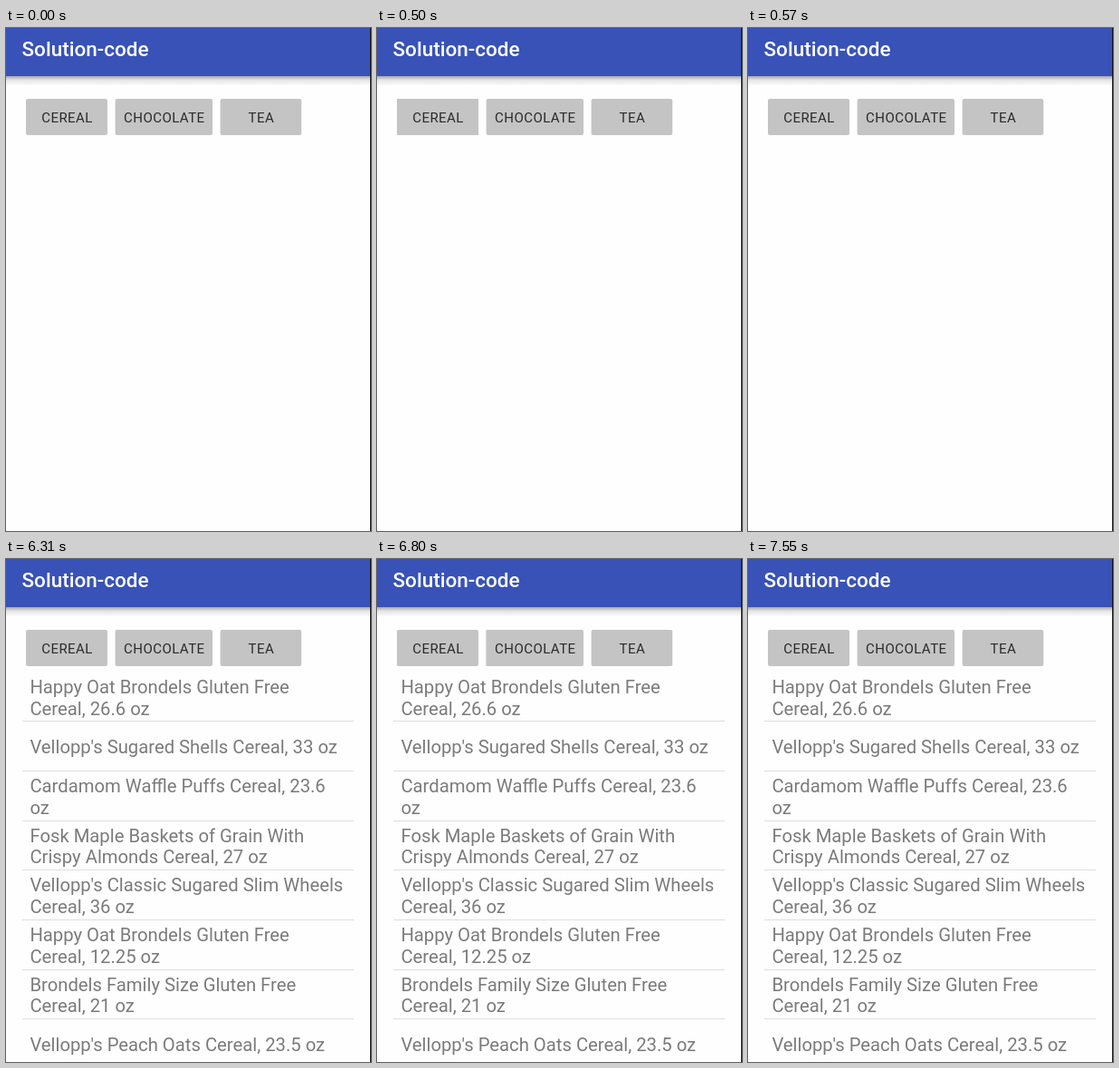
These frames come from a looping animation (403 by 554 pixels, 8 s). An HTML page:

```html
<!DOCTYPE html>
<html lang="en">
<head>
<meta charset="utf-8">
<title>Grocery search</title>
<style>
  html, body { margin: 0; width: 100%; height: 100%; overflow: hidden; background: #fefefe; }
  svg { display: block; width: 403px; height: 554px; }
  text { font-family: Roboto, Arial, sans-serif; }
  .title { font-size: 22.5px; font-weight: 500; fill: #fff; }
  .label { font-size: 15px; letter-spacing: 0.45px; fill: #2a2a2a; text-anchor: middle; }
  .item { font-size: 20.25px; fill: #7b7b7b; }
  .button { fill: #c4c4c4; }
</style>
</head>
<body>
<svg id="stage" viewBox="0 0 403 554">
  <defs>
    <linearGradient id="shade" x1="0" y1="0" x2="0" y2="1">
      <stop offset="0" stop-color="#a4a7b2"/>
      <stop offset="0.2" stop-color="#c4c4c7"/>
      <stop offset="0.45" stop-color="#e6e6e6"/>
      <stop offset="1" stop-color="#fafafa"/>
    </linearGradient>
  </defs>
  <rect width="403" height="554" fill="#fefefe"/>
  <rect y="53" width="403" height="10" fill="url(#shade)"/>
  <rect width="403" height="53" fill="#3852b7"/>
  <text class="title" x="17.5" y="31">Solution-code</text>
  <g id="buttons"></g>
  <g id="list" visibility="hidden"></g>
  <rect x="402" width="1" height="554" fill="#111"/>
</svg>
<script>
  const LOOP = 8000;
  const LIST_AT = 6310;
  const PRESS_MS = 70;
  const ROW = 54.62;

  // x, width, label, press time, width of the pressed patch
  const buttons = [
    [22, 90, "CEREAL", 500, 90],
    [120.6, 107.4, "CHOCOLATE", 6800, 98],
    [236.6, 89.6, "TEA"]
  ];

  const items = [
    ["Happy Oat Brondels Gluten Free", "Cereal, 26.6 oz"],
    ["Vellopp's Sugared Shells Cereal, 33 oz"],
    ["Cardamom Waffle Puffs Cereal, 23.6", "oz"],
    ["Fosk Maple Baskets of Grain With", "Crispy Almonds Cereal, 27 oz"],
    ["Vellopp's Classic Sugared Slim Wheels", "Cereal, 36 oz"],
    ["Happy Oat Brondels Gluten Free", "Cereal, 12.25 oz"],
    ["Brondels Family Size Gluten Free", "Cereal, 21 oz"],
    ["Vellopp's Peach Oats Cereal, 23.5 oz"]
  ];

  function add(parent, tag, attrs, text = "") {
    const el = document.createElementNS("http://www.w3.org/2000/svg", tag);
    for (const key in attrs) el.setAttribute(key, attrs[key]);
    el.textContent = text;
    parent.appendChild(el);
    return el;
  }

  const bar = document.getElementById("buttons");
  const list = document.getElementById("list");
  const presses = [];

  for (const [x, width, label, at, patch] of buttons) {
    const box = { class: "button", x, y: 78, width, height: 40 };
    add(bar, "rect", { ...box, rx: 2 });
    if (at) presses.push({ at, el: add(bar, "rect", { ...box, width: patch }) });
    add(bar, "text", { class: "label", x: x + width / 2 + 0.5, y: 104.2 }, label);
  }

  items.forEach((lines, i) => {
    const first = (lines.length > 1 ? 148 : 159.6) + i * ROW;
    lines.forEach((line, j) =>
      add(list, "text", { class: "item", x: 26.4, y: first + j * 23.6 }, line));
    if (i < items.length - 1) {
      add(list, "rect", {
        x: 18, y: Math.round(178.45 + i * ROW), width: 366, height: 1, fill: "#dedede"
      });
    }
  });

  const show = (el, on) => el.setAttribute("visibility", on ? "visible" : "hidden");
  const start = performance.now();

  function draw() {
    const t = (performance.now() - start) % LOOP;
    show(list, t >= LIST_AT);
    for (const { at, el } of presses) show(el, t >= at && t < at + PRESS_MS);
    requestAnimationFrame(draw);
  }
  draw();
</script>
</body>
</html>
```
